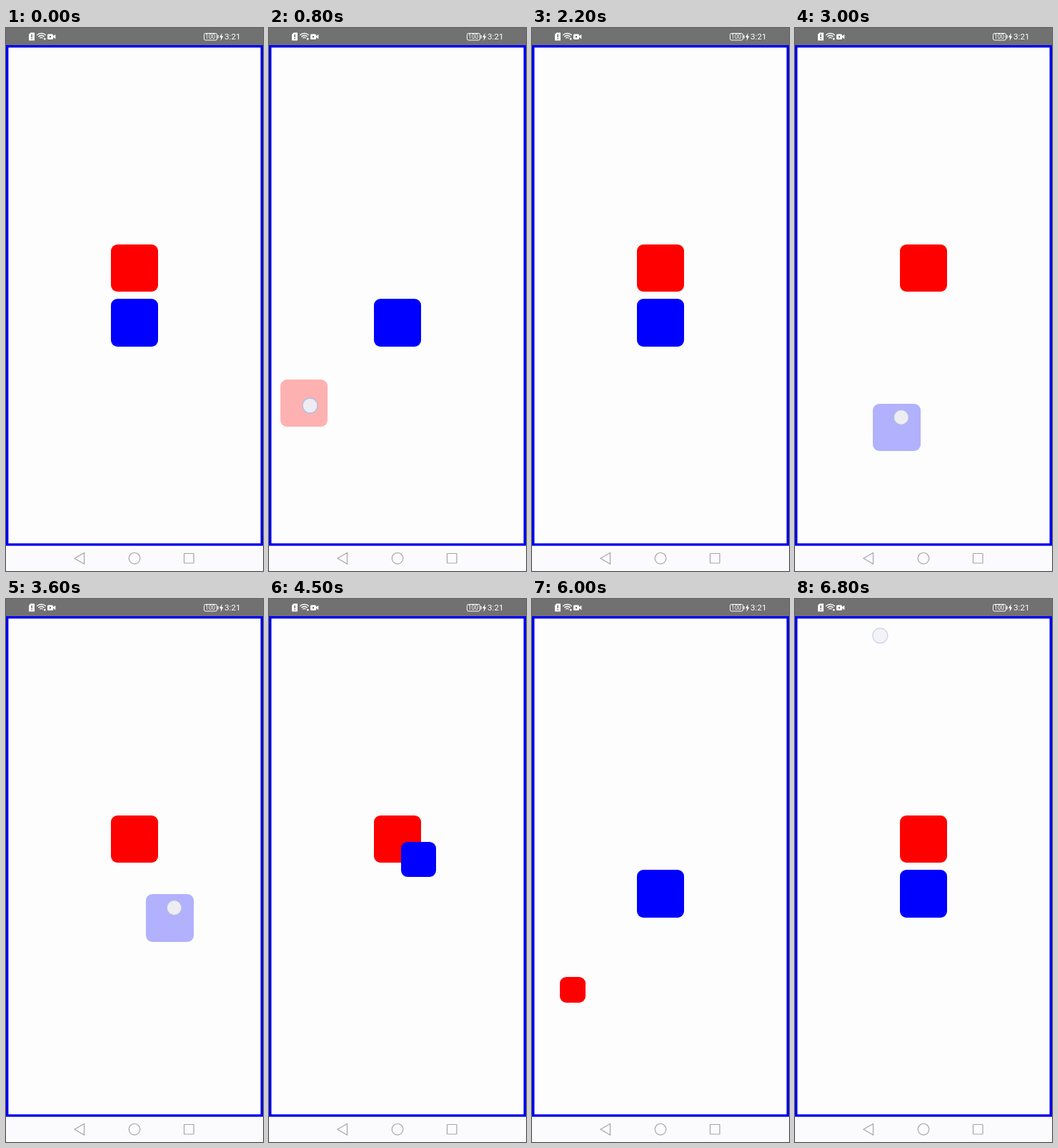
An HTML page with a canvas for the animation above (6.9 s loop, 360 by 760 pixels).

```html
<!DOCTYPE html>
<html lang="en">
<head>
<meta charset="utf-8">
<title>Drag and return</title>
<style>
  html, body { margin: 0; width: 100%; height: 100%; overflow: hidden; }
  canvas { display: block; width: 360px; height: 760px; }
</style>
</head>
<body>
<canvas id="stage" width="360" height="760"></canvas>
<script>
const ctx = document.getElementById('stage').getContext('2d');
const LOOP = 6900, STEP = 100, RETURN_TIME = 400;
const SIZE = 66.5, RADIUS = 9, SMALL = 0.46;
const WHITE = '#ffffff', BAR = '#717171', NAV = '#a3a3ae';

const red = { color: '#ff0000', home: { x: 146.75, y: 302.75 } };
const blue = { color: '#0000ff', home: { x: 146.75, y: 379.25 } };

// Each drag eases from home through its turning points, then flies back.
const drags = [
  { block: red, start: 400, release: 1800, grip: { x: 42, y: 37 }, turns: [
    { t: 800, x: 15.5, y: 491.5 }, { t: 1200, x: 9.5, y: 509 }] },
  { block: blue, start: 2500, release: 4300, grip: { x: 39.5, y: 19 }, turns: [
    { t: 2700, x: 154, y: 309 }, { t: 3100, x: 101, y: 566 }, { t: 3300, x: 62, y: 590 },
    { t: 3800, x: 269, y: 317 }, { t: 4100, x: 56, y: 20 }, { t: 4300, x: 206, y: 283 }] },
  { block: red, start: 5100, release: 5900, grip: { x: 43.5, y: 44 }, turns: [
    { t: 5400, x: 26.5, y: 423.8 }, { t: 5700, x: 1, y: 553 }] }
];

const mix = (a, b, k) => a + (b - a) * k;
const ease = k => k * k * (3 - 2 * k);
const between = (a, b, k) => ({ x: mix(a.x, b.x, k), y: mix(a.y, b.y, k) });

function dragPosition(drag, t) {
  let from = { t: drag.start, ...drag.block.home };
  for (const to of drag.turns) {
    if (t < to.t) return between(from, to, ease((t - from.t) / (to.t - from.t)));
    from = to;
  }
  return from;
}

function paint(fill) {
  if (fill) {
    ctx.fillStyle = fill;
    ctx.fill();
  } else {
    ctx.stroke();
  }
}

function rect(x, y, w, h, color) {
  ctx.fillStyle = color;
  ctx.fillRect(x, y, w, h);
}

function shape(points, fill) {
  ctx.beginPath();
  points.forEach(([x, y]) => ctx.lineTo(x, y));
  ctx.closePath();
  paint(fill);
}

function roundBox(x, y, w, h, r, fill) {
  ctx.beginPath();
  ctx.roundRect(x, y, w, h, r);
  paint(fill);
}

function circle(x, y, r, fill) {
  ctx.beginPath();
  ctx.arc(x, y, r, 0, Math.PI * 2);
  paint(fill);
}

function text(str, x, y, size) {
  ctx.font = `${size}px Roboto, sans-serif`;
  ctx.fillStyle = WHITE;
  ctx.fillText(str, x, y);
}

function touchDot(x, y, alpha) {
  ctx.globalAlpha = alpha;
  ctx.strokeStyle = '#b4bde2';
  ctx.lineWidth = 1.3;
  circle(x, y, 10.5, '#ededf3');
  circle(x, y, 10.5);
  ctx.globalAlpha = 1;
}

function drawStatusBar() {
  rect(0, 0, 360, 24, BAR);

  shape([[32, 9], [34.5, 6.5], [40, 6.5], [40, 17.5], [32, 17.5]], WHITE);
  rect(35.3, 9, 1.6, 4, BAR);
  rect(35.3, 14, 1.6, 1.6, BAR);

  ctx.strokeStyle = WHITE;
  ctx.lineWidth = 1.3;
  for (let r = 3; r <= 9; r += 3) {
    ctx.beginPath();
    ctx.arc(49.5, 16.5, r, -Math.PI * 0.75, -Math.PI * 0.25);
    ctx.stroke();
  }
  rect(53, 14, 2.5, 2.5, WHITE);

  roundBox(58, 8.5, 8, 7.5, 1.5, WHITE);
  shape([[65, 12], [69.3, 9], [69.3, 15.5]], WHITE);
  rect(61, 11, 2, 2.5, BAR);

  ctx.lineWidth = 1;
  roundBox(277.5, 7.5, 18, 9.5, 2);
  rect(296.5, 10, 1.2, 4.5, WHITE);
  text('100', 279, 15.3, 8.5);
  shape([[302.8, 7], [299, 13], [301.3, 13], [300.5, 18], [304.3, 11.5], [302, 11.5]], WHITE);
  text('3:21', 306, 16.3, 11.7);
}

function drawNavigation() {
  rect(0, 725, 360, 35, '#fbfbfd');
  ctx.lineWidth = 1.2;
  ctx.strokeStyle = NAV;
  shape([[96, 742.3], [109.5, 734.5], [109.5, 750.2]]);
  circle(180, 742.3, 7.8);
  roundBox(249.5, 735.5, 13.5, 13.5, 0.5);
}

// Edges snap to whole pixels, as a phone screen lays them out.
function drawSquare({ x, y }, size, color) {
  const left = Math.round(x), top = Math.round(y);
  roundBox(left, top, Math.round(x + size) - left, Math.round(y + size) - top, RADIUS, color);
}

function drawBlock(block, t) {
  const drag = drags.find(d => d.block === block && t >= d.start && t < d.release + RETURN_TIME);
  if (!drag) return drawSquare(block.home, SIZE, block.color);

  const place = dragPosition(drag, t);
  if (t < drag.release) {
    ctx.globalAlpha = 0.3;
    drawSquare(place, SIZE, block.color);
    touchDot(place.x + drag.grip.x, place.y + drag.grip.y, 1);
    return;
  }
  const k = ease((t - drag.release) / RETURN_TIME);
  const size = SIZE * mix(SMALL, 1, k), inset = (SIZE - size) / 2;
  const { x, y } = between(place, block.home, k);
  drawSquare({ x: x + inset, y: y + inset }, size, block.color);
}

function draw(t) {
  rect(0, 0, 360, 760, '#fdfdfd');
  drawStatusBar();
  drawNavigation();
  ctx.strokeStyle = '#0000f0';
  ctx.lineWidth = 3.4;
  ctx.strokeRect(1.7, 25.7, 356.6, 697.3);

  drawBlock(red, t);
  drawBlock(blue, t);
  if (t >= LOOP - STEP) touchDot(119.3, 51.3, 0.6);
}

const start = performance.now();
function tick() {
  const t = (performance.now() - start) % LOOP;
  draw(Math.floor(t / STEP) * STEP);
  requestAnimationFrame(tick);
}
tick();
</script>
</body>
</html>
```
